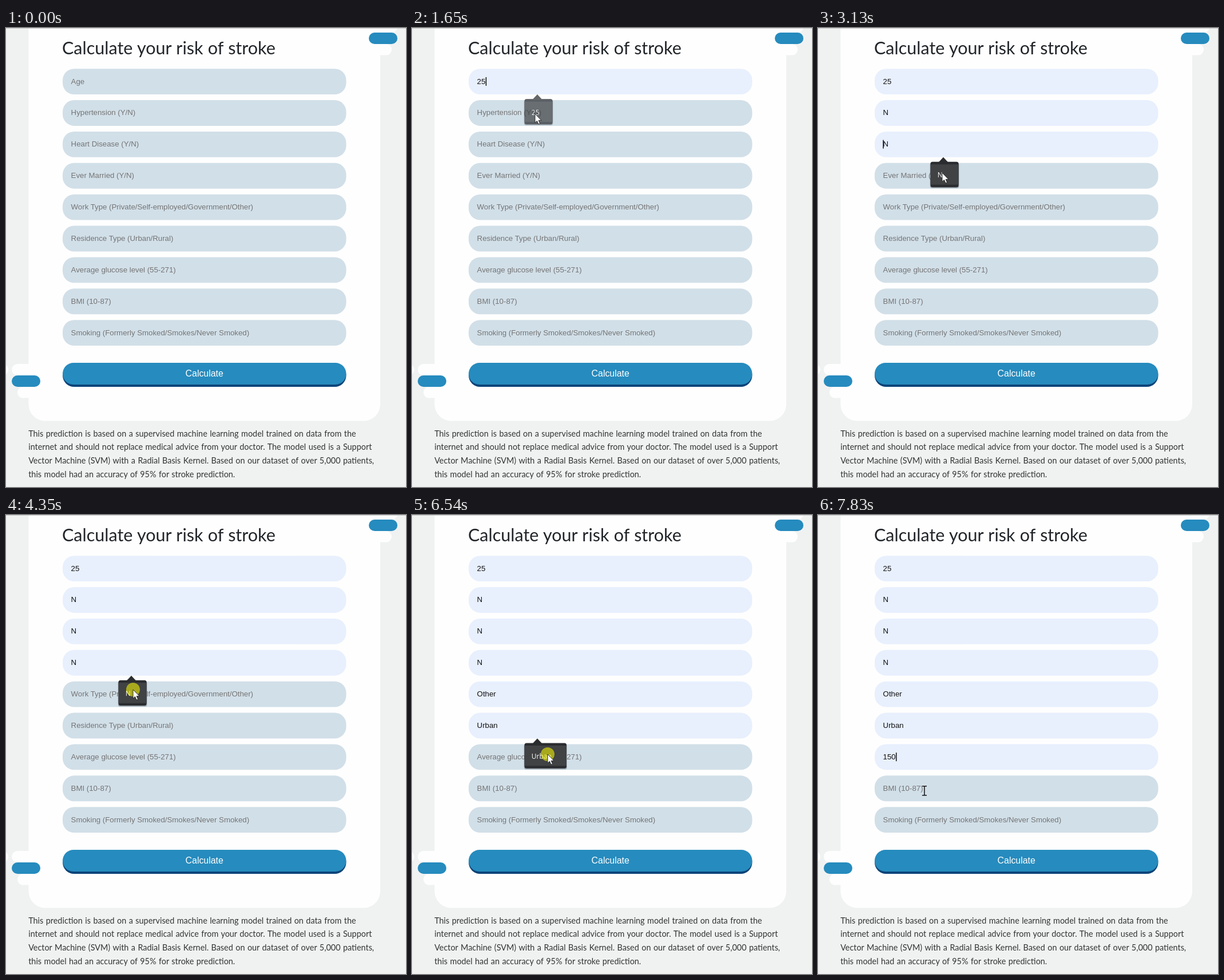
An HTML page that plays this animation: 699x802 px, repeating every 8 s.

```html
<!DOCTYPE html>
<html lang="en">
<head>
<meta charset="utf-8">
<title>Stroke risk form</title>
<style>
html, body { margin: 0; width: 100%; height: 100%; overflow: hidden; background: #f0f2f2; }
svg { display: block; width: 100%; height: 100%; }
text { white-space: pre; }
.title { font: 30.5px Lato, sans-serif; word-spacing: .5px; fill: #212529; }
.note text { font: 14.4px Lato, sans-serif; word-spacing: .8px; fill: #333; }
.field, .button { font-family: "Liberation Sans", Arial, sans-serif; }
.field { font-size: 13.25px; }
.field rect { fill: #d1dfe8; }
.field text { fill: #757575; }
.filled rect { fill: #e8f0fe; }
.filled text { fill: #111; }
.button { font-size: 15.9px; fill: #fff; }
.popup { font: 12px "Open Sans", sans-serif; fill: #fff; }
.box { fill: #2a2c2f; }
.item { fill: #404244; }
</style>
</head>
<body>
<svg viewBox="0 0 699 802" xmlns="http://www.w3.org/2000/svg">
  <g fill="#fefefe">
    <rect x="39.5" y="-40" width="614.5" height="726.5" rx="29"/>
    <rect x="634" y="-12" width="50" height="20" rx="10"/>
    <rect x="624" y="28" width="50" height="19.5" rx="9.7"/>
    <rect x="-46" y="587" width="50" height="20" rx="10"/>
    <rect x="10" y="587" width="50" height="20" rx="10"/>
    <rect x="20" y="627" width="50" height="19.5" rx="9.7"/>
  </g>
  <g fill="#268bbe">
    <rect x="634" y="8" width="50" height="20" rx="10"/>
    <rect x="10" y="607" width="50" height="20" rx="10"/>
  </g>
  <rect width="699" height="1" fill="#c4c6c6"/>
  <text class="title" x="98" y="46">Calculate your risk of stroke</text>
  <g id="fields"></g>
  <rect x="99" y="587" width="495.5" height="40" rx="20" fill="#0d4479"/>
  <rect x="99" y="585" width="495.5" height="38" rx="19" fill="#268bbe"/>
  <text class="button" x="346.7" y="609.3" text-anchor="middle">Calculate</text>
  <g class="note">
    <text x="39.2" y="713.5">This prediction is based on a supervised machine learning model trained on data from the</text>
    <text x="39.2" y="737.3">internet and should not replace medical advice from your doctor. The model used is a Support</text>
    <text x="39.2" y="761.1">Vector Machine (SVM) with a Radial Basis Kernel. Based on our dataset of over 5,000 patients,</text>
    <text x="39.2" y="784.9">this model had an accuracy of 95% for stroke prediction.</text>
  </g>
  <rect id="caret" width="1.4" height="15" fill="#000"/>
  <g id="popups"></g>
  <g id="pointer">
    <circle id="press" r="12" fill="#ff0" opacity=".55"/>
    <path id="arrow" d="M0 0V15.5L3.5 12.3L6 18L8.6 16.9L6.2 11.4H11Z" fill="#fff" stroke="#222" stroke-width=".9"/>
    <path id="beam" d="M-4 -8H-1Q0 -8 0 -7Q0 -8 1 -8H4M0 -7V7M-4 8H-1Q0 8 0 7Q0 8 1 8H4" fill="none" stroke="#111" stroke-width="1.5"/>
  </g>
</svg>
<script>
const LOOP = 8000, PRESS = 140, FADE = 180;
const $ = id => document.getElementById(id);
const clamp = v => Math.max(0, Math.min(1, v));
const show = (el, on) => { el.style.display = on ? "" : "none"; };
const top0 = i => 71.2 + 54.88 * i;
const popTop = i => top0(i) + 52.9;

// times in ms: focus = field clicked, hover = suggestion previewed,
// blink = caret goes off, pick = suggestion chosen
const rows = [
  { label: "Age", value: "25", w: 49, focus: 970, hover: 1320, blink: 1450, pick: 1600 },
  { label: "Hypertension (Y/N)", value: "N", w: 49, focus: 1790, hover: 2200, blink: 2270, pick: 2610 },
  { label: "Heart Disease (Y/N)", value: "N", w: 49, focus: 2820, hover: 3060, blink: 3210, pick: 3550 },
  { label: "Ever Married (Y/N)", value: "N", w: 49, focus: 3760, hover: 4050, blink: 4160, pick: 4430 },
  { label: "Work Type (Private/Self-employed/Government/Other)", value: "Other", w: 73.4, focus: 4640, hover: 5080, blink: 5150, pick: 5430 },
  { label: "Residence Type (Urban/Rural)", value: "Urban", w: 73.4, focus: 5770, hover: 6110, blink: 6320, pick: 6600 },
  { label: "Average glucose level (55-271)", value: "150", w: 60, focus: 6810, hover: 7080, blink: 7430, pick: 7640 },
  { label: "BMI (10-87)" },
  { label: "Smoking (Formerly Smoked/Smokes/Never Smoked)" }
];

// pointer stops: time, x, y
const path = [
  [130, 690, 753], [900, 276, 94], [1110, 276, 94], [1400, 215, 150],
  [2130, 215, 150], [2270, 217, 199], [2960, 217, 199], [3110, 217, 253],
  [3950, 217, 253], [4090, 222, 305], [4860, 222, 305], [5060, 236, 364],
  [5980, 236, 364], [6180, 237, 418], [6990, 237, 418], [7200, 222, 470],
  [7220, 222, 470], [7290, 215, 481], [7740, 215, 481], [7820, 186, 481.7]
];

$("fields").innerHTML = rows.map((r, i) => `<g class="field">
  <rect x="99" y="${top0(i)}" width="495.5" height="44.8" rx="20"/>
  <text x="113.6" y="${top0(i) + 26.3}">${r.label}</text></g>`).join("");

const active = rows.filter(r => r.value);
$("popups").innerHTML = active.map((r, i) => {
  const y = popTop(i);
  return `<g class="popup">
  <rect x="195.7" y="${y + 1}" width="${r.w + 1.8}" height="45.2" rx="4" fill="#000" opacity=".22"/>
  <path class="box" d="M210.5 ${y + 1}L219 ${y - 8}L227.5 ${y + 1}Z"/>
  <rect class="box" x="196.6" y="${y}" width="${r.w}" height="44.3" rx="3.5"/>
  <rect class="item" x="196.6" y="${y + 4.4}" width="${r.w}" height="35.5"/>
  <text x="208.8" y="${y + 27.4}">${r.value}</text></g>`;
}).join("");

rows.forEach((r, i) => {
  r.el = $("fields").children[i];
  r.text = r.el.querySelector("text");
});
active.forEach((r, i) => {
  r.popup = $("popups").children[i];
  r.item = r.popup.querySelector(".item");
  r.next = active[i + 1] ? active[i + 1].focus : LOOP;
});

function pointerAt(t) {
  const k = path.findIndex(p => p[0] > t);
  if (k < 0) return path[path.length - 1].slice(1);
  if (k === 0) return path[0].slice(1);
  const a = path[k - 1], b = path[k];
  const f = (t - a[0]) / (b[0] - a[0]);
  const e = f * f * (3 - 2 * f);
  return [a[1] + (b[1] - a[1]) * e, a[2] + (b[2] - a[2]) * e];
}

function draw(t) {
  const [x, y] = pointerAt(t);
  let caret = null, pressed = false, onPopup = false;

  active.forEach((r, i) => {
    const filled = t >= r.hover;
    r.el.classList.toggle("filled", filled);
    const words = filled ? r.value : r.label;
    if (r.text.textContent !== words) r.text.textContent = words;

    const alpha = t < r.pick ? clamp((t - r.focus - 90) / 50) : clamp(1 - (t - r.pick) / FADE);
    show(r.popup, alpha > 0);
    r.popup.setAttribute("opacity", alpha);
    show(r.item, filled);
    const py = popTop(i);
    if (alpha > .02 && x >= 197 && x <= 197 + r.w && y >= py - 4 && y <= py + 44) onPopup = true;

    if (t >= r.focus && t < r.blink) caret = [113.4, i];
    if (t >= r.pick && t < r.next) caret = [114 + r.text.getComputedTextLength(), i];
    if (t >= r.focus && t < r.focus + PRESS || t >= r.pick - PRESS && t < r.pick) pressed = true;
  });

  show($("caret"), caret);
  if (caret) {
    $("caret").setAttribute("x", caret[0]);
    $("caret").setAttribute("y", top0(caret[1]) + 14.7);
  }

  const onField = x > 99 && x < 594 && rows.some((r, i) => y > top0(i) && y < top0(i) + 44.8);
  const beam = onField && !onPopup;
  show($("pointer"), t >= 130);
  $("pointer").setAttribute("transform", `translate(${x.toFixed(2)} ${y.toFixed(2)})`);
  show($("press"), pressed);
  show($("beam"), beam);
  show($("arrow"), !beam);
}

const start = performance.now();
function tick() {
  draw((performance.now() - start) % LOOP);
  requestAnimationFrame(tick);
}
tick();
</script>
</body>
</html>
```
